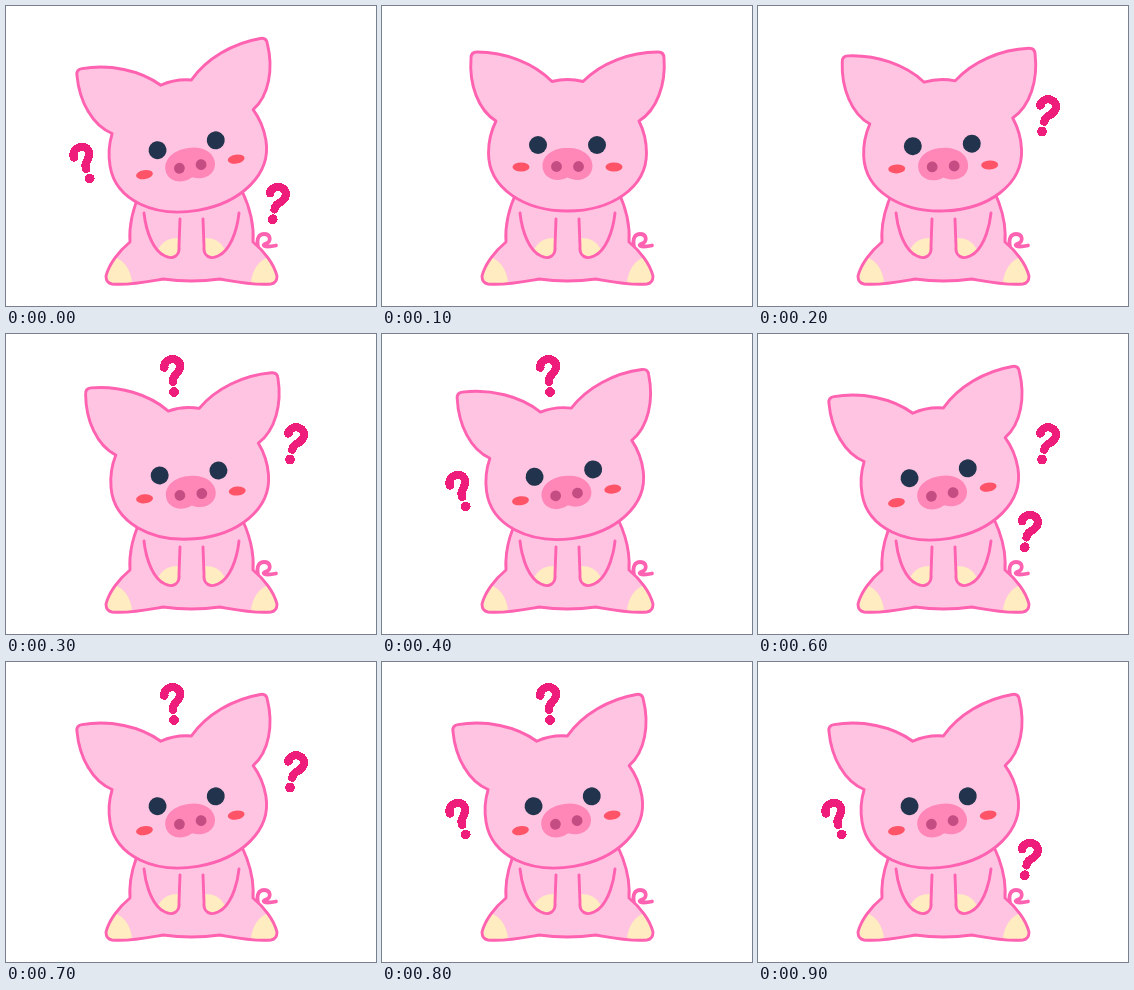
Animation of 370x300 px, one loop 1 s. Source, as an HTML page:

```html
<!DOCTYPE html>
<html lang="en">
<head>
<meta charset="utf-8">
<title>Puzzled pig</title>
<style>
  html, body { margin: 0; width: 100%; height: 100%; overflow: hidden; background: #fff; }
  svg { display: block; width: 100vw; height: 100vh; }
  .skin { fill: #ffc4e2; }
  .line { stroke: #ff62b0; stroke-width: 2.9; stroke-linecap: round; stroke-linejoin: round; }
  .hoof { fill: #ffecc0; }
</style>
</head>
<body>
<svg viewBox="0 0 370 300">
  <defs>
    <path id="body" d="M135 185C125 206 123 222 124 236C113 245 103 258 100 270Q100 277 106 278C125 279.500 145 275 157 273Q185.500 277 214 273C226 275 246 279.500 265 278Q271 277 271 270C268 258 258 245 247 236C248 222 246 206 236 185"/>
    <g id="leg">
      <path class="hoof" d="M108 251C118 254 125 264 126 276.500Q112 279 106 278Q100 277 100 270Q103 259 108 251Z"/>
      <path class="hoof" d="M152 244Q158 231 173.500 232V240C174 250 167 254 159 250Q155 248 152 244Z"/>
      <path class="line" fill="none" d="M138 207C140 225 147 245 159 250C167 254 174 250 173 240L174 213"/>
    </g>
    <g id="face">
      <circle cx="156" cy="139" r="9" fill="#22344d"/>
      <ellipse cx="139" cy="161" rx="8.500" ry="4.500" fill="#ff5468"/>
    </g>
    <g id="mark" fill="#ee1c7b" shape-rendering="crispEdges">
      <path fill="none" stroke="#ee1c7b" stroke-width="8.200" stroke-linecap="round"
        d="M-10-25C-9-36 7-35 6-25C5-17-2-18-1-10"/>
      <circle cx="-9.700" cy="-24.500" r="4.400"/>
      <circle r="4.900"/>
    </g>
  </defs>

  <path fill="none" stroke="#ff62b0" stroke-width="3.800" stroke-linecap="round"
    d="M252 241C250 231 254 228 258 228C265 228 265.500 236 260 237.500C255 239 258 242 270 239.500"/>
  <use class="skin" href="#body"/>
  <use href="#leg"/>
  <use href="#leg" transform="translate(371) scale(-1 1)"/>
  <use class="line" fill="none" href="#body"/>

  <g id="head">
    <path class="skin line" d="M170 75.500Q185.500 71.500 201 75.500C219 57 248 46 276 46Q282 46 282 52C284 78 275 104 257 115C262 125 264.500 136 264.500 147C264.500 182 229 205 185.500 205C142 205 106.500 182 106.500 147C106.500 136 109 125 114 115C96 104 87 78 89 52Q89 46 95 46C123 46 152 57 170 75.500Z"/>
    <use href="#face"/>
    <use href="#face" transform="translate(371) scale(-1 1)"/>
    <path fill="#ff87b8" d="M185.500 142C199 141.500 210.500 149 210.500 160C210.500 172 197 177.500 185.500 171.500C174 177.500 160.500 172 160.500 160C160.500 149 172 141.500 185.500 142Z"/>
    <g fill="#c44d83">
      <circle cx="174.500" cy="160.500" r="5.400"/>
      <circle cx="196.500" cy="160.500" r="5.400"/>
    </g>
  </g>

  <!-- order of appearance: right, top, left, lower right -->
  <use class="mark" href="#mark" transform="translate(284 125.500) rotate(18)"/>
  <use class="mark" href="#mark" transform="translate(168 58)"/>
  <use class="mark" href="#mark" transform="translate(83.700 172.500) rotate(-15)"/>
  <use class="mark" href="#mark" transform="translate(266.700 213.300) rotate(16)"/>
</svg>
<script>
  const STEP = 100, COUNT = 10;
  const head = document.getElementById('head');
  const marks = document.querySelectorAll('.mark');
  const start = performance.now();

  function draw(now) {
    const tick = Math.floor(Math.max(0, now - start) / STEP) % COUNT;
    const beat = (tick + COUNT - 1) % COUNT;   // 0 is the upright pose
    const tilt = -2.4 * Math.min(beat, 4);
    const turn = Math.min(beat, 8);            // the last pose is held for two steps

    head.setAttribute('transform', `rotate(${tilt} 184.5 168)`);
    marks.forEach((mark, i) => {
      const age = turn - 1 - i;                // each mark stays two steps out of four
      const shown = age >= 0 && age % 4 < 2;
      mark.setAttribute('visibility', shown ? 'visible' : 'hidden');
    });
    requestAnimationFrame(draw);
  }
  draw(start);
</script>
</body>
</html>
```
